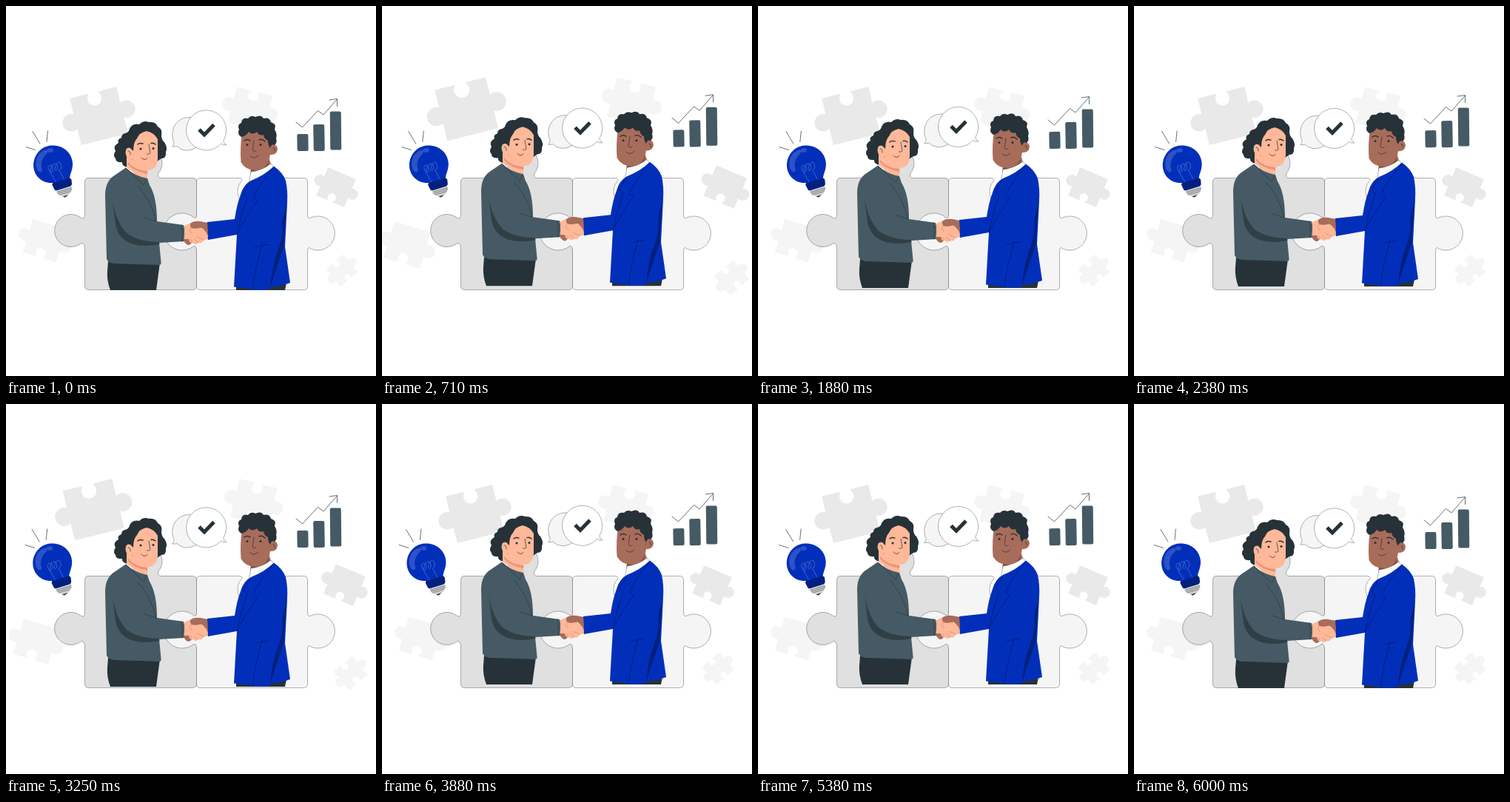
Recreate the animation shown at these times as an HTML page. Size 500x500 px, loop 6.04 s.

```html
<!DOCTYPE html>
<html lang="en">
<head>
<meta charset="utf-8">
<title>Partnership</title>
<style>
  html, body { margin: 0; width: 100%; height: 100%; overflow: hidden; background: #fff; }
  svg { display: block; width: 100vw; height: 100vh; }
  .line { fill: none; stroke: #263238; stroke-width: .7; stroke-linecap: round; stroke-linejoin: round; }
  .brow { stroke-width: 1.4; }
  .edge { stroke: #263238; stroke-width: .5; stroke-opacity: .75; }
  .dark { fill: #263238; }
  .slate { fill: #455a64; }
  .shade { fill: #303f46; }
  .blue { fill: #022fba; }
  .navy { fill: #02207e; }
  .pink { fill: #ffb898; }
  .brown { fill: #a86c5a; }
</style>
</head>
<body>
<svg viewBox="0 0 500 500">
  <g id="pieces"></g>

  <g class="edge">
    <path fill="#e0e0e0" d="M111 232.500H174Q178 230 174 226A21 21 0 1 1 206 226Q204 232 209 232.500H252Q257.500 232.500 257.500 238V378Q257.500 383.500 252 383.500H112Q106.500 383.500 106.500 378V328Q106.500 319 101 321A22 22 0 1 1 101 286Q106.500 290 106.500 281V238Q106.500 232.500 111 232.500Z"/>
    <path fill="#f5f5f5" d="M263 232.500H316Q321 234 318 237A21 21 0 1 0 350 237Q347 233 352 232.500H402Q407.500 232.500 407.500 238V281Q407.500 289 412 286A23 23 0 1 1 412 328Q407.500 324 407.500 332V378Q407.500 383.500 402 383.500H263Q257.500 383.500 257.500 378V332Q257.500 322 253 325A25 25 0 1 1 253 285Q257.500 289 257.500 282V238Q257.500 232.500 263 232.500Z"/>
  </g>

  <g id="bulb">
    <path class="line" d="M27 190.500L39.500 194.500M36 169.500L46 186M56.500 169L55 183.500"/>
    <path class="blue" d="M63 239C48 240 38 229 37.200 217C36.500 202 47 189.500 61 188.500C77 187.500 89 198 90 212C90.500 222 86 227 86 234L64 243Z"/>
    <path fill="#fff" opacity=".17" d="M52 195C42 199 38 211 42 221C45 226 49 225 49 221C46 213 49 205 55 200C58 196 56 193 52 195Z"/>
    <ellipse cx="60" cy="195" rx="4" ry="3" fill="#fff" opacity=".17"/>
    <path fill="none" stroke="#fff" stroke-width=".6" opacity=".4" d="M68 239L57 220C56 215 62 213 63 218C64 224 61 227 60 223C60 216 66 210 69 215C71 220 68 225 66 221C66 214 72 208 74 213C76 218 74 221 72 222L79 235"/>
    <path class="navy" d="M64 239L85 232.500Q88 232 88.500 235L89 240Q89 243 86 244L69 249.500Q66 250 65 247L62.500 242Q62 240 64 239Z"/>
    <path fill="#d0d0d0" d="M68 249.500L88 243.500L89.500 248L86 254L81 257.500Q77 258.500 75 256.500L70 254Z"/>
    <path class="line" stroke-opacity=".7" d="M69 251.500L89 245.500M70 253.500L89 247.700M71.500 255.300L87.500 250.500"/>
    <path class="dark" d="M77 257.500L84 255L81 258Q79 259 77 257.500Z"/>
  </g>

  <g id="bubbles">
    <path class="edge" fill="#f5f5f5" d="M224.500 190Q228 187 227 184C221 172 227 154 243 151C257 148 268 159 268 172C268 187 254 196 242 195Q235 194 231 189.500Q228 190.500 224.500 190Z"/>
    <path class="edge" fill="#fff" d="M298 187.500Q293.500 185.500 293.900 181.500A27 27 0 1 0 290.600 186Q294 188.500 298 187.500Z"/>
    <path fill="none" stroke="#263238" stroke-width="5" d="M261 167L268 174L281 160.500"/>
  </g>

  <g id="chart">
    <g class="slate">
      <rect x="393.500" y="173" width="15" height="23" rx="2" transform="rotate(-1 401 185)"/>
      <rect x="415.500" y="160" width="15" height="36" rx="2" transform="rotate(-1 423 178)"/>
      <rect x="438" y="142.500" width="15" height="52" rx="2" transform="rotate(-.6 445 168)"/>
    </g>
    <path class="line" d="M392 157L400.500 164L421.500 141.500L429 147L447 126.500M437 127L447.500 125.500V135.500"/>
  </g>

  <g id="people">
    <!-- left figure -->
    <path class="dark" d="M138 345L208 347L203 384H141Q136 371 137 358Z"/>
    <path class="dark" d="M161 172Q166 171 167 166Q171 158 180 160Q186 154 193 157Q202 156 205 163Q212 166 210 176Q211 182 214 184Q219 192 216 197Q217 206 210 206L204 210L164 218Q156 216 157 211Q148 212 148 206Q144 202 148 196Q144 189 152 185Q150 180 156 178Q156 173 161 172Z"/>
    <path class="pink" d="M163 203V218L180 231L191 233L192 219Z"/>
    <path fill="#e8957c" d="M165 211Q174 222 191 223V227Q173 224 165 214Z"/>
    <path class="pink" d="M172 196Q172 184 177 179Q180 171 190 169Q200 171 205 180V207Q204 221 192 222Q177 222 171 207Q162 207 161.500 198Q162 190 168 192Z"/>
    <path class="line" d="M165 196Q168 195 168 201M193 187L195 199Q193 201 190.500 200M183 205Q187 210 191 205.500"/>
    <path class="line brow" d="M178 187Q180 184.500 185 186M196 185.500Q199 184.500 202 187"/>
    <circle class="dark" cx="182" cy="193" r="1.500"/><circle class="dark" cx="199" cy="192.500" r="1.500"/>
    <path class="slate" d="M162 218.500L145 230Q134 238 134 256L136 342Q139 348 148 348L207 350Q210 350 209.500 346L207 320L241 318Q243 307 240 296L204 291Q204 258 194 242L191 233Q174 230 162 218.500Z"/>
    <path class="shade" d="M144 264Q149 292 163 307Q180 319 207 319L207.500 322Q177 328 160 316Q150 308 148 295Z"/>
    <path class="line" stroke-opacity=".8" d="M162 219L186 242L190 234M178 243Q196 262 203 291L187 286M237 296Q239 307 238 318"/>

    <!-- right figure -->
    <path class="dark" d="M311 375L379 374L377 384H311Z"/>
    <path class="brown" d="M331 211L354 201L360 220L330 237Z"/>
    <path fill="#824c40" d="M331 220Q348 219 355 207L355 214Q346 225 331 225Z"/>
    <path class="brown" d="M319 172Q337 163 356 175L357 188Q366 185 367 193Q366 202 357 201Q354 220 340 222Q324 223 317.500 211Q316 191 319 172Z"/>
    <path class="dark" d="M318 177Q312 173 315 167Q312 160 318 158Q319 150 327 152Q331 147 337 150Q345 146 348 152Q356 150 358 157Q366 159 363 167Q367 173 365 179Q367 184 363 188Q358 186 357 192Q354 188 354 182Q349 180 348 174Q342 176 339 170Q333 175 328 170Q324 176 318 177Z"/>
    <path class="line" d="M335 182L333 195Q335 198 338 196M330 203Q335 208 341 202M361 192Q364 191 363 196"/>
    <path class="line brow" d="M322 182Q326 179 330 182M342 181Q346 179 350 183"/>
    <circle class="dark" cx="326" cy="187.500" r="1.500"/><circle class="dark" cx="344" cy="187.500" r="1.500"/>
    <path fill="#fafafa" d="M331 224Q347 222 358 213L363 220L333 245L328 240Z"/>
    <path class="line" stroke-opacity=".5" d="M331 224Q347 222 358 213L361 217M331 224L328.500 238"/>
    <path class="blue" d="M362 216.500Q374 225 378 236Q381 250 380 266L377 325L384 374Q371 379 357 380L356 383Q333 384.500 332 382.500L308 379.500L312 309L273 316Q270 304 272 292L309 288Q312 268 317 255Q321 241 331 236Q349 229 362 216.500Z"/>
    <path class="navy" d="M379 268L375 326L357 380Q360 349 367 332Q376 309 373 292Z"/>
    <path d="M330 238L321 254L326 258L317 287L312 309M362 218Q340 244 334 260L340 263Q321 290 312 309M346 321Q337 352 333 382M356 322Q339 324 335 326" fill="none" stroke="#011a70" stroke-width=".7"/>

    <!-- handshake -->
    <path class="brown" d="M272 293L262 291Q254 290 249 294L247 300L240 312Q239 318 244 322Q248 325 251 320L264 318L273 314Z"/>
    <path class="pink" d="M241 297L250 293Q252 295 250 300Q257 302 265 299Q272 306 273 312Q272 317 267 316Q265 322 260 320Q257 324 252 320Q248 321 247 315L241 315Z"/>
    <path fill="none" stroke="#d0826a" stroke-width=".6" d="M250 300Q247 306 252 308M258 312L267 316M254 315L260 320M249 315L252 320"/>
    <path class="brown" d="M249 294Q257 289 272 293L273 310Q268 300 262 299Q255 302 249 298Z"/>
  </g>
</svg>

<script>
const LOOP = 6040, SPAN = 6000;
const $ = id => document.getElementById(id);

// A square with knobs left and right, and sockets above and below where asked.
function piece(x, y, side, angle, color, top, bottom) {
  const h = side / 2, k = side * .128, r = side * .17;
  const arc = `A${r} ${r} 0 1`;
  const upper = top ? `H${-k}${arc} 0 ${k} ${-h}` : '';
  const lower = bottom ? `H${k}${arc} 0 ${-k} ${h}` : '';
  const d = `M${-h} ${-h}${upper}H${h}V${-k}${arc} 1 ${h} ${k}` +
            `V${h}${lower}H${-h}V${k}${arc} 1 ${-h} ${-k}Z`;
  return `<path d="${d}" fill="${color}" stroke="${color}" stroke-width="2"
    stroke-linejoin="round" transform="translate(${x} ${y}) rotate(${angle})"/>`;
}

$('pieces').innerHTML = [
  [125.5, 148.5, 63, -14, '#e9e9e9', true, false],
  [330, 139.5, 48, 14, '#f5f5f5', true, true],
  [446, 245, 39, 23, '#e9e9e9', false, true],
  [52, 317, 45, 17, '#f5f5f5', false, true],
  [454, 357.5, 29, -40, '#f5f5f5', true, true]
].map(p => piece(...p)).join('');

// Steps are [progress, value] pairs.
const BEAT = [[0, 1], [.1, 1.1], [.3, 1], [.4, 1], [.5, 1.1], [.6, 1], [1, 1]];
const SHAKE = [[0, 0], [.1, -1], [.2, 2], [.3, -4], [.4, 4], [.5, -4], [.6, 4], [.7, -4], [.8, 2], [.9, -1], [1, 0]];
const FLOAT = [[0, 0], [.5, -6], [1, 0]];

function at(steps, time, period) {
  const p = time % period / period;
  const i = steps.findIndex(s => s[0] > p);
  const [p0, v0] = steps[i - 1], [p1, v1] = steps[i];
  return v0 + (v1 - v0) * (p - p0) / (p1 - p0);
}

const move = (id, value) => $(id).setAttribute('transform', value);

function draw(now) {
  const t = Math.min(now % LOOP, SPAN);
  move('pieces', `translate(250 250) scale(${at(BEAT, t, 6000)}) translate(-250 -250)`);
  move('bulb', `translate(${at(SHAKE, t, 3000)} 0)`);
  move('bubbles', `translate(0 ${at(FLOAT, t, 3000)})`);
  move('chart', `translate(0 ${at(FLOAT, t, 1500)})`);
  move('people', `translate(0 ${at(FLOAT, t, 1500)})`);
}

const start = performance.now();
function tick() {
  draw(performance.now() - start);
  requestAnimationFrame(tick);
}
tick();
</script>
</body>
</html>
```
